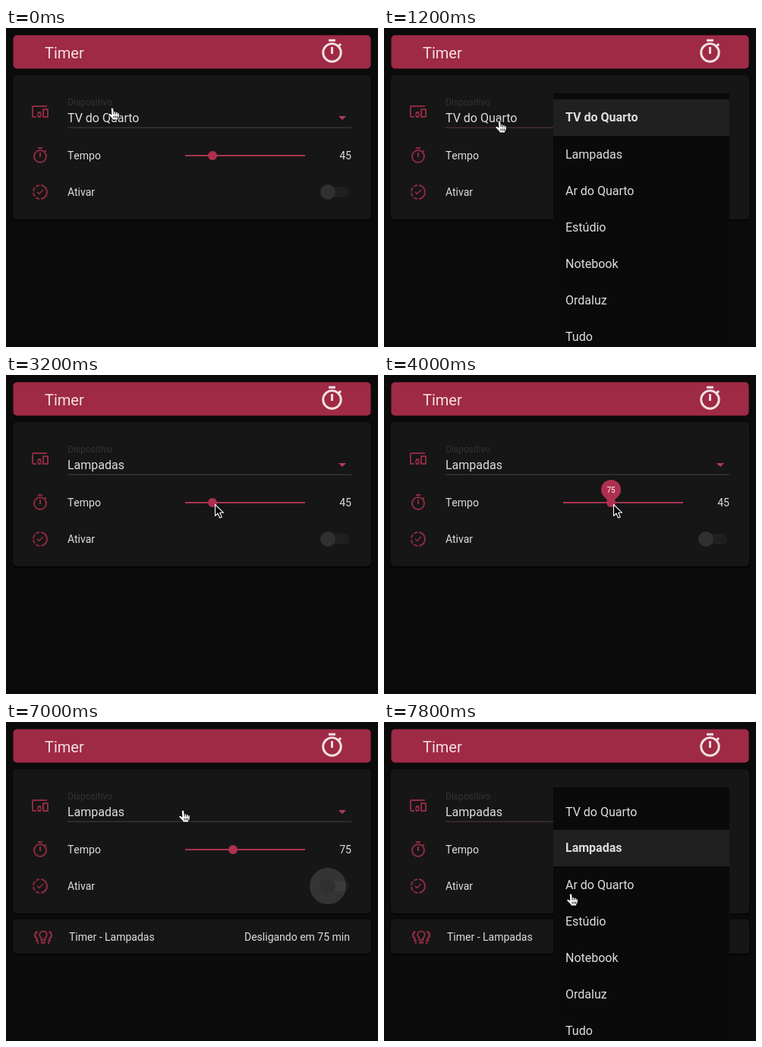
Write an HTML page that moves like this. It is 490 px wide and 420 px high and loops after 8000 ms.

```html
<!DOCTYPE html>
<html lang="pt">
<head>
<meta charset="utf-8">
<title>Timer</title>
<style>
  html, body { margin: 0; width: 100%; height: 100%; overflow: hidden; background: #0b0b0b; }
  svg { display: block; width: 490px; height: 420px; font: 14px Roboto, sans-serif; }
  text { fill: #dedede; }
  .big { font-size: 16px; }
  .end { text-anchor: end; }
  .line { fill: none; stroke: #8e2a42; stroke-width: 2; }
  .red { fill: #8e2a42; }
  .card { fill: #161616; filter: drop-shadow(0 1px 1px #000); }
</style>
</head>
<body>
<svg viewBox="0 0 490 420">
  <defs>
    <g id="watch">
      <circle cx="12" cy="13" r="8"/>
      <path d="M9 2h6M12 8v6M17.9 7.2l2-2"/>
    </g>
  </defs>

  <rect x="9.5" y="9.5" width="471" height="44" rx="5" fill="#9f2a45"/>
  <text x="51" y="40" style="font-size:20px;fill:#f1e0e4">Timer</text>
  <use href="#watch" class="line" transform="translate(411.8 13.3) scale(1.47)" style="stroke:#f1e0e4"/>

  <rect class="card" x="9" y="62" width="472" height="190" rx="5"/>

  <g transform="translate(33 98)">
    <path class="line" d="M21 5H3Q2 5 2 6V18Q2 19 3 19H7M16 9H22V19H16Z" stroke-linejoin="round"/>
    <circle class="line" cx="11" cy="16" r="2.25" style="stroke-width:1.5"/>
    <path class="red" d="M9 12h4v2H9zM9 18h4v2H9z"/>
  </g>
  <text x="81" y="102" style="font-size:12px;fill:#333">Dispositivo</text>
  <text id="device" class="big" x="81" y="124"></text>
  <path id="under" d="M81 131.2H455" stroke-width="1.2"/>
  <path d="M438 116h10l-5 5z" fill="#b23a58"/>

  <use href="#watch" class="line" transform="translate(33 156)"/>
  <text x="81" y="173" style="font-kerning:none">Tempo</text>
  <path class="line" d="M236 168H394" style="stroke:#a83450"/>
  <g id="knob">
    <circle r="6" fill="#ae304e"/>
    <g id="pin">
      <path d="M0 1.4L-9.2 -7.8A13 13 0 1 1 9.2 -7.8Z" fill="#ae304e"/>
      <text id="pinText" y="-13.5" text-anchor="middle" style="font-size:10px;fill:#fff"></text>
    </g>
  </g>
  <text id="minutes" class="end" x="455" y="173"></text>

  <g transform="translate(33 204)">
    <path class="line" d="M13 3.05A9 9 0 0 1 13 20.95"/>
    <path class="line" d="M11 20.95A9 9 0 0 1 11 3.05" stroke-dasharray="5.2 1.9"/>
    <path class="line" d="M8 11.8l2.6 2.6 5.4-5.4" style="stroke-width:1.6"/>
  </g>
  <text x="81" y="221">Ativar</text>
  <rect id="track" x="416" y="209" width="36" height="14" rx="7"/>
  <g id="toggle">
    <circle id="halo" r="24"/>
    <circle id="wave" r="18" fill-opacity=".09"/>
    <circle id="thumb" r="10"/>
  </g>

  <g id="job">
    <rect class="card" x="9" y="260" width="472" height="45" rx="5"/>
    <g transform="translate(49 283)">
      <path class="line" d="M-2.5 4V1.3A4.8 4.8 0 1 1 2.5 1.3V4Z"/>
      <path class="red" d="M-3 6h6v1.8q0 1-1 1h-4q-1 0-1-1z"/>
      <path id="side" class="line" d="M7.5 -7A5 5 0 0 1 8.5 2V5H6.2M6.2 8h2" style="stroke-width:2.4"/>
      <use href="#side" transform="scale(-1 1)"/>
    </g>
    <text x="83" y="288">Timer - Lampadas</text>
    <text class="end" x="453" y="288">Desligando em 75 min</text>
  </g>

  <g id="menu">
    <rect x="223" y="86" width="232" height="340" rx="2" fill="#0a0a0a"/>
    <rect id="focus" x="223" width="232" height="48" fill="#202020"/>
  </g>

  <g id="cursor" stroke-linejoin="round">
    <path id="hand" fill="#fff" stroke="#000" stroke-width=".9" transform="scale(1.1 1)"
      d="M-1.6 1.4Q-1.5 0 0 0Q1.4 0 1.5 1.4L1.9 5Q3.4 4.2 4.1 5.6Q5.7 4.9 6.4 6.3Q8.4 5.8 8.4 8V11Q8 13 7 14V16H0V14.4Q-2 12.5 -4.6 9.2Q-5.3 7.6 -3.8 7.3Q-2.6 7.2 -1 9ZM1.9 5v3.5M4.1 5.6v3M6.4 6.3v2.4M1.9 10.5v3M4 10.5v3M6 10.5v3"/>
    <path id="arrow" fill="#000" stroke="#fff" stroke-width="1.1"
      d="M.5 .5V15.5L4 12.2L6.6 18L9.2 16.9L6.7 11.3H11.5Z"/>
  </g>
</svg>

<script>
const LOOP = 8000, STEP = 200;
const $ = id => document.getElementById(id);
const set = (id, attrs) => {
  for (const k in attrs) $(id).setAttribute(k, attrs[k]);
};
const show = (id, on) => set(id, { visibility: on ? 'visible' : 'hidden' });
const ramp = (t, from, to) => Math.min(1, Math.max(0, (t - from) / (to - from)));
const ease = p => p * p * (3 - 2 * p);

const items = ['TV do Quarto', 'Lampadas', 'Ar do Quarto', 'Estúdio', 'Notebook', 'Ordaluz', 'Tudo'];
const rows = items.map((label, i) => {
  const el = document.createElementNS('http://www.w3.org/2000/svg', 'text');
  el.setAttribute('class', 'big');
  el.setAttribute('x', 239);
  el.textContent = label;
  $('menu').append(el);
  return el;
});

// Pointer moves: start, end, then where it arrives.
const moves = [
  [0, 400, 152, 122], [1200, 1800, 265, 168], [2400, 3200, 275, 170],
  [3200, 4000, 302, 170], [4600, 5400, 434, 217], [6200, 7000, 233, 116], [7400, 7800, 246, 226]
];

function pointer(t) {
  let x = 140, y = 105;
  for (const [from, to, endX, endY] of moves) {
    const p = ease(ramp(t, from, to));
    x += (endX - x) * p;
    y += (endY - y) * p;
  }
  return `translate(${x} ${y})`;
}

function drawMenu(t) {
  const picked = t >= 2200 ? 1 : 0;
  const focused = t >= 2000 ? 1 : 0;
  const open = ramp(t, 600, 1000) - ramp(t, 2000, 2400) + ramp(t, 7200, 7600);
  $('device').textContent = items[picked];
  $('menu').style.opacity = open;
  $('menu').style.clipPath = `inset(0 0 ${(1 - open) * 50}% 0)`;
  set('focus', { y: 94 + 48 * focused });
  set('under', { stroke: open ? '#4a2f3f' : '#40353b' });
  rows.forEach((el, i) => {
    el.setAttribute('y', (i === picked ? 123 : 124) + 48 * i);
    el.style.fontWeight = i === picked ? 700 : 400;
  });
}

function drawSlider(t) {
  const value = 45 + 5 * Math.round(6 * ease(ramp(t, 3200, 4000)));
  set('knob', { transform: `translate(${272 + .9 * (value - 45)} 168)` });
  show('pin', t > 3200 && t < 4600);
  $('pinText').textContent = value;
  $('minutes').textContent = t < 4600 ? 45 : 75;
}

function drawToggle(t) {
  const on = t >= 5600 && t < 6200;
  const ink = on ? '#ae304e' : '#aaa';
  set('toggle', { transform: `translate(${on ? 444 : 424} 216)` });
  set('halo', { fill: ink, 'fill-opacity': .2 * ramp(t, 5000, 5400) });
  set('wave', { fill: ink });
  show('wave', t >= 5400 && t < 5800);
  set('thumb', { fill: on ? ink : '#303030' });
  set('track', { fill: on ? '#5c2030' : '#1f1f1f' });
  show('job', t >= 6200);
}

function draw(t) {
  const arrow = t >= 2600 && t < 5200;
  drawMenu(t);
  drawSlider(t);
  drawToggle(t);
  set('cursor', { transform: pointer(t) });
  show('hand', !arrow);
  show('arrow', arrow);
}

function tick() {
  draw(Math.floor(performance.now() % LOOP / STEP) * STEP);
  requestAnimationFrame(tick);
}
tick();
</script>
</body>
</html>
```
